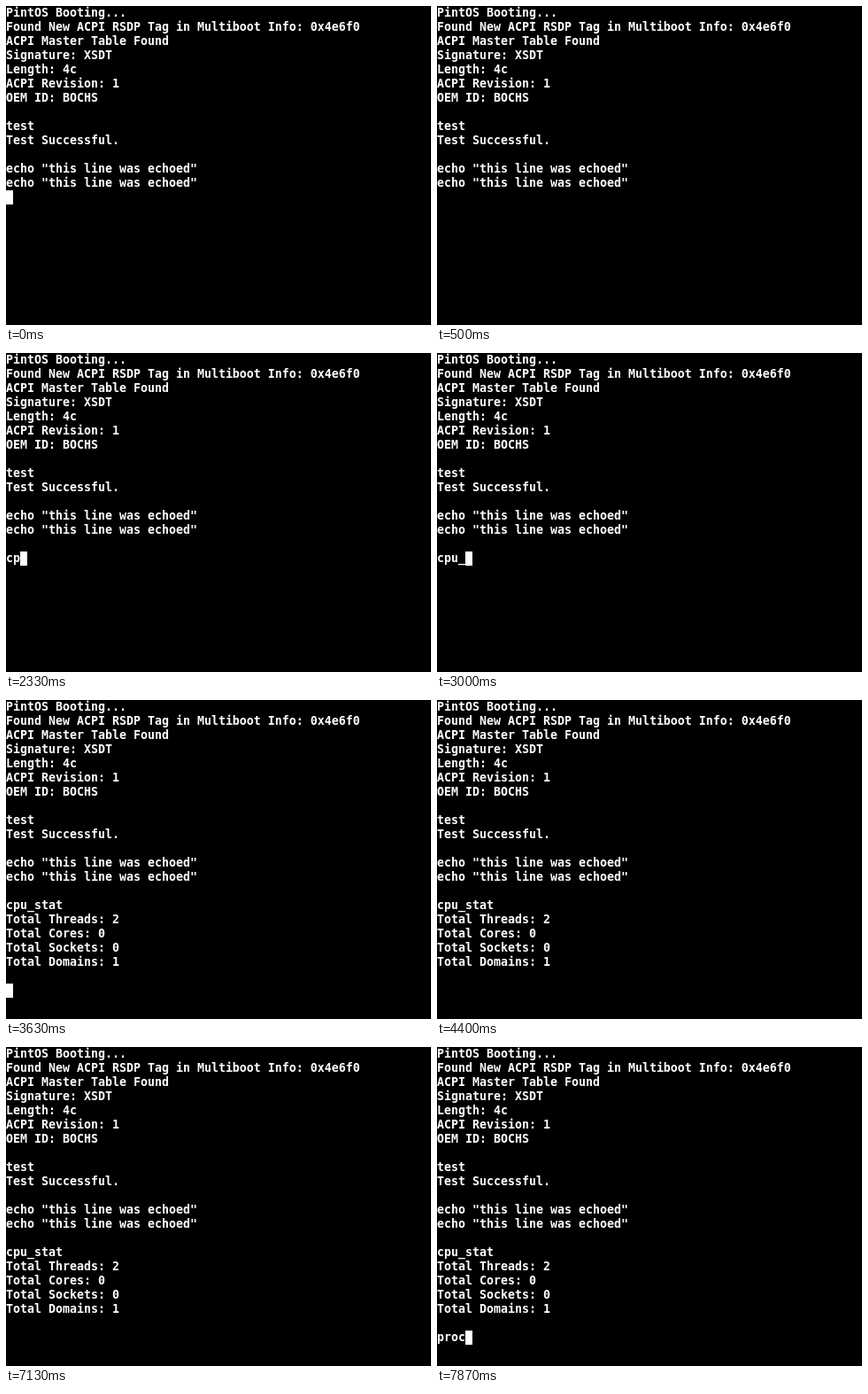
Animation of 480x360 px, one loop 8000 ms. Source, as an HTML page:

```html
<!DOCTYPE html>
<html lang="en">
<head>
<meta charset="utf-8">
<title>Boot console</title>
<style>
  html, body { margin: 0; width: 100%; height: 100%; overflow: hidden; background: #000; }
  #screen {
    position: absolute; left: 0; top: 0; margin: 0;
    color: #fff; white-space: pre;
    font: bold 13.29px/16px "DejaVu Sans Mono", "Liberation Mono", monospace;
    font-variant-ligatures: none;
  }
  #cursor { position: absolute; width: 8px; height: 16px; background: #fff; }
</style>
</head>
<body>
<pre id="screen"></pre>
<div id="cursor"></div>
<script>
const LOOP = 8000;
const screenEl = document.getElementById('screen');
const cursorEl = document.getElementById('cursor');

const boot = `PintOS Booting...
Found New ACPI RSDP Tag in Multiboot Info: 0x4e6f0
ACPI Master Table Found
Signature: XSDT
Length: 4c
ACPI Revision: 1
OEM ID: BOCHS

test
Test Successful.

echo "this line was echoed"
echo "this line was echoed"
`;

const stats = `
Total Threads: 2
Total Cores: 0
Total Sockets: 0
Total Domains: 1

`;

// Each entry appends its text at the given time (ms).
const type = (word, times) => times.map((at, i) => [at, word[i]]);
const output = [
  [0, boot],
  [30, '\n'],
  ...type('cpu_stat', [2130, 2270, 2400, 2830, 3070, 3170, 3270, 3370]),
  [3630, stats],
  ...type('proc', [7370, 7530, 7700, 7870]),
];

// The cursor blinks while idle and stays lit while typing.
const hidden = [[400, 1400], [4400, 5400], [6400, 7370]];

let shown = null;
function draw() {
  const t = performance.now() % LOOP;
  const text = output.filter(([at]) => at <= t).map(([, s]) => s).join('');
  if (text !== shown) {
    const lines = text.split('\n');
    screenEl.textContent = shown = text;
    cursorEl.style.left = lines.at(-1).length * 8 + 'px';
    cursorEl.style.top = (lines.length - 1) * 16 + 'px';
  }
  const off = hidden.some(([from, to]) => t >= from && t < to);
  cursorEl.style.visibility = off ? 'hidden' : 'visible';
  requestAnimationFrame(draw);
}
draw();
</script>
</body>
</html>
```
